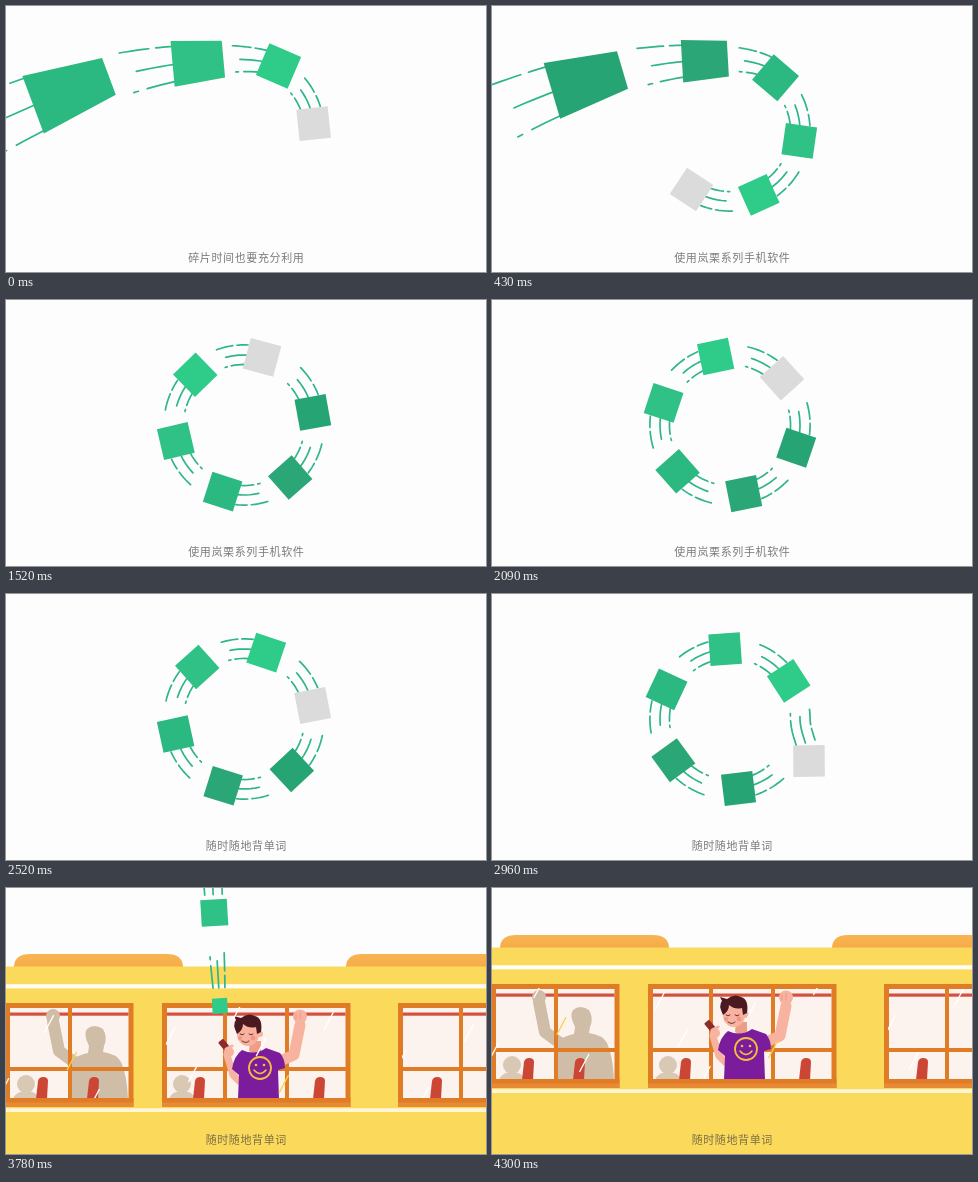
These frames come from a looping animation (480x266 px, 4.34 s). An HTML page:

```html
<!DOCTYPE html>
<html lang="zh-CN">
<head>
<meta charset="utf-8">
<style>
  html, body { margin: 0; width: 100%; height: 100%; overflow: hidden; background: #fdfdfe; }
  svg { display: block; width: 100vw; height: 100vh; }
  #caption {
    font: 500 11px "Noto Sans CJK SC", "Noto Sans CJK", sans-serif;
    letter-spacing: .62px; text-anchor: middle; fill: #3c3c3c; fill-opacity: .68;
  }
</style>
</head>
<body>
<svg id="stage" viewBox="0 0 480 266">
  <defs>
    <linearGradient id="hump" x2="0" y2="1">
      <stop offset="0" stop-color="#f8b452"/><stop offset="1" stop-color="#f6ab48"/>
    </linearGradient>
    <clipPath id="pane"><rect x="160" y="100" width="180" height="92"/></clipPath>
  </defs>
  <rect width="480" height="266" fill="#fdfdfe"/>
  <g id="bus"></g>
  <g id="cards"></g>
  <text id="caption" x="240.3" y="255.6"></text>
</svg>
<script>
const LOOP = 4340;
const PAN = 440;
const CENTER = { x: 238, y: 125, r: 70 };
const RING_START = -50, RING_END = 360;
const COLORS = ['#dbdbdc', '#2ecb89', '#2fc186', '#2bb981', '#2ba777', '#26a473'];
const CAPTIONS = [[0, '碎片时间也要充分利用'], [300, '使用岚栗系列手机软件'], [2520, '随时随地背单词']];
const $ = id => document.getElementById(id);
const clamp = (v, a = 0, b = 1) => Math.min(b, Math.max(a, v));
const rad = deg => deg * Math.PI / 180;

// Keys are [position, value, slope]; straight lines continue past both ends.
function hermite(keys, x) {
  const line = ([p, v, m]) => v + m * (x - p);
  if (x <= keys[0][0]) return line(keys[0]);
  const i = keys.findIndex(k => k[0] > x);
  if (i < 0) return line(keys[keys.length - 1]);
  const [x0, v0, m0] = keys[i - 1], [x1, v1, m1] = keys[i];
  const h = x1 - x0, u = (x - x0) / h, w = 1 - u;
  return v0 * (1 + 2 * u) * w * w + m0 * h * u * w * w
       + v1 * u * u * (3 - 2 * u) - m1 * h * u * u * w;
}

// Progress of the leading card, in degrees around the ring.
const TRAVEL = [[0, -6, .27], [910, 233.5, .12], [2090, 318, .066], [2960, 388, .1],
                [3390, 541, .4], [3780, 698, .43], [4300, 975, .58]];
const CAMERA = [[2970, 0, 0], [3390, 260, 1], [3780, 421, .1], [4300, PAN, 0]];
// The chain of cards stretches slightly as it travels.
const spacing = t => 57 + t * .00135;

const ENTRY = {
  x: [[-237, -90, 2.8], [-177, 65, 2.4], [-120, 192, 1.65], [-63, 272.5, 1.1], [-50, 283, .936]],
  y: [[-237, 155, -1.4], [-177, 84.5, -.9], [-120, 55.5, -.15], [-63, 60, .45], [-50, 71.4, .785]],
  size: [[-237, 120, -.7], [-177, 81, -.6], [-120, 51, -.4], [-63, 34.5, -.1], [0, 31.5, 0]]
};
const EXIT = {
  x: [[125, 308, 0], [168, 317, -.02], [240, 325, -.02], [309, 311, -.35], [397, 264, -.5], [560, 217, -.1]],
  size: [[125, 31.5, 0], [309, 31.5, 0], [397, 30, -.04], [441, 27, -.1], [547, 13, -.3], [570, 5, -.4]]
};
const LANDING = 566;

function point(s, t) {
  if (s < RING_START) return { x: hermite(ENTRY.x, s), y: hermite(ENTRY.y, s) };
  if (s < RING_END) {
    const a = rad(s);
    return { x: CENTER.x + CENTER.r * Math.cos(a), y: CENTER.y + CENTER.r * Math.sin(a) };
  }
  const y = CENTER.y + 1.5 * (s - RING_END);
  const u = clamp((t - 3390) / 390), sway = u * u * (3 - 2 * u);
  const straight = 208 + .06 * (y - 441);
  return { x: hermite(EXIT.x, y) * (1 - sway) + straight * sway, y };
}

function pose(s, t) {
  const p = point(s, t), a = point(s - .5, t), b = point(s + .5, t);
  const size = s < RING_END ? hermite(ENTRY.size, s) : Math.max(2, hermite(EXIT.size, p.y));
  return { ...p, size, angle: Math.atan2(b.y - a.y, b.x - a.x) };
}

// Point at (along, across) in a pose's own axes.
const local = (p, along, across) => {
  const c = Math.cos(p.angle), n = Math.sin(p.angle);
  return `${(p.x + along * c - across * n).toFixed(2)},${(p.y + along * n + across * c).toFixed(2)}`;
};

// Each line: [offset across the card, [from, to] behind it, ...]
const TRAILS = [[-.32, [12, 20], [23, 35]], [0, [12, 30]], [.3, [12, 27], [31, 33]]];

function trailPath(s, t) {
  let d = '';
  for (const [offset, ...dashes] of TRAILS)
    for (const [from, to] of dashes)
      for (let i = 0; i <= 5; i++) {
        const p = pose(s - from - (to - from) * i / 5, t);
        d += (i ? 'L' : 'M') + local(p, 0, offset * p.size);
      }
  return d;
}

// Cards far up the entry path are seen in perspective.
function cardShape(s, t) {
  const p = pose(s, t), depth = clamp((-63 - s) / 114);
  const w = p.size / 2, h = w * (1 - .38 * depth), k = .22 * depth;
  return [[-w, -h * (1 + k)], [w, -h * (1 - k)], [w, h * (1 - k)], [-w, h * (1 + k)]]
    .map(c => local(p, ...c)).join(' ');
}

const rect = (x, y, w, h, fill, r = 0) =>
  `<rect x="${x}" y="${y}" width="${w}" height="${h}" rx="${r}" fill="${fill}"/>`;
const circle = (x, y, r, fill) => `<circle cx="${x}" cy="${y}" r="${r}" fill="${fill}"/>`;
const fill = (d, color) => `<path d="${d}" fill="${color}"/>`;
const stroke = (d, color, width) =>
  `<path d="${d}" fill="none" stroke="${color}" stroke-width="${width}" stroke-linecap="round" stroke-linejoin="round"/>`;

const seat = x => fill(`M${x} 192L${x + 2} 174Q${x + 3} 170 ${x + 7} 170Q${x + 12} 170 ${x + 12} 174L${x + 11} 192Z`, '#cb4635');
const TAN = '#cfbda7', SKIN = '#f7b39f', HAIR = '#4b1a20', SHIRT = '#7a1c9c', GOLD = '#f3bf3f';

const child = x => circle(x, 177, 9, '#d8c8b4')
  + fill(`M${x - 13} 192Q${x - 10} 184 ${x} 184Q${x + 11} 184 ${x + 13} 192Z`, '#d8c8b4');

const passenger =
  fill('M62 192L66 152Q76 147 82 146L83 139Q77 127 81 122Q88 116 97 122Q102 130 98 139L97 145Q111 147 115 155Q121 168 122 192Z', TAN)
  + stroke('M72 158L53 144L47 114', TAN, 12) + circle(47, 109, 7, TAN);

const hero =
  stroke('M274 154L288 148L294 118', SKIN, 11) + circle(294, 109.5, 7, SKIN)
  + stroke('M290 107V112M294 106V112', '#e8927e', .8)
  + stroke('M221 148L227 168L233 174', SKIN, 7)
  + fill('M244 134H255V144Q250 149 243 144Z', '#ee9d88')
  + fill('M236 143Q249 149 260 141L274 146Q279 152 279 161L272 163L273 192H232L233 168L226 162Q228 149 236 143Z', SHIRT)
  + `<ellipse cx="242" cy="127" rx="11" ry="12" fill="${SKIN}"/>` + circle(254, 127, 3, SKIN)
  + fill('M231 127Q226 117 230 113L228 109L235 111Q242 105 249 109Q257 111 255 125L251 127L250 120Q243 122 237 117Q237 123 231 127Z', HAIR)
  + circle(247, 131, 2.4, '#f29583') + circle(234, 131, 2, '#f29583')
  + stroke('M234 127Q236 129 238 127M243 127Q245 129 247 127M236 134Q240 137 243 134', '#6b2a2a', 1)
  + `<rect x="-7" y="-3.2" width="14" height="6.4" rx="1" fill="#8d2a2a" transform="translate(219 139) rotate(50)"/>`
  + circle(223, 145, 5, SKIN) + stroke('M220 142L226 139', SKIN, 3)
  + `<circle cx="254" cy="161" r="11" fill="none" stroke="${GOLD}" stroke-width="1.8"/>`
  + circle(250, 158, 1.3, GOLD) + circle(258, 158, 1.3, GOLD)
  + stroke('M248 163Q254 170 260 163', GOLD, 1.6);

const ORANGE = '#e17c26';
const carWindow = (dx, behind, front, index) => `<g transform="translate(${dx} 0)">
  ${rect(156, 96, 188.5, 104, ORANGE)}${rect(161, 101, 178.5, 90, '#fdf3ee')}
  ${rect(161, 105.5, 178.5, 3.2, '#d4513f')}
  <g transform="translate(${-dx} 0)">${behind}</g>
  ${rect(217, 99, 4, 93, ORANGE)}${rect(279, 99, 4, 93, ORANGE)}${rect(159, 160, 183, 4, ORANGE)}
  <g transform="translate(${-dx} 0)">${front}</g>
  <g clip-path="url(#pane)" id="rain${index}"></g>
  ${rect(156, 191, 188.5, 4.5, ORANGE)}${rect(156, 195.5, 188.5, 4.5, '#e88a34')}
</g>`;

const roofHump = x => `<path d="M${x} 61V59Q${x + 1} 47 ${x + 16} 47H${x + 153}Q${x + 168} 47 ${x + 169} 59V61Z" fill="url(#hump)"/>`;

$('bus').innerHTML = roofHump(8) + roofHump(340)
  + rect(0, 59.5, 480, 210, '#fbd95b') + rect(0, 77.2, 480, 4.2, '#fffdf4') + rect(0, 201.2, 480, 3.8, '#fff6d8')
  + carWindow(-217, child(20) + passenger, seat(30) + seat(81), 0)
  + carWindow(0, child(176), seat(187) + seat(307) + hero, 1)
  + carWindow(236, '', seat(424), 2);

$('cards').innerHTML = COLORS.map(c =>
  `<g>${stroke('', '#2fb58b', 1.7)}<polygon fill="${c}"/></g>`).join('');
const cards = [...$('cards').children];

function rain(index, t) {
  let lines = '';
  for (let k = 0; k < 6; k++) {
    const u = (t / 620 + k * .37 + index * .23) % 1;
    const x = 176 + k * 31 - 22 * u, y = 88 + 100 * u;
    lines += stroke(`M${x} ${y}l-9 17`, k === 4 ? '#f6d447' : '#ffffff', 1.3);
  }
  $('rain' + index).innerHTML = lines;
}

function draw(t) {
  const camera = t < 2970 ? 0 : Math.min(PAN, hermite(CAMERA, t));
  const lead = hermite(TRAVEL, t);
  $('bus').setAttribute('transform', `translate(0 ${PAN - camera})`);
  $('cards').setAttribute('transform', `translate(0 ${-camera})`);
  cards.forEach((card, i) => {
    const s = lead - spacing(t) * i;
    const visible = s < RING_END || point(s, t).y < LANDING;
    card.style.display = visible ? '' : 'none';
    if (!visible) return;
    card.firstChild.setAttribute('d', trailPath(s, t));
    card.lastChild.setAttribute('points', cardShape(s, t));
  });
  if (camera > 0) [0, 1, 2].forEach(i => rain(i, t));
  $('caption').textContent = CAPTIONS.filter(c => c[0] <= t).pop()[1];
}

let start;
function tick(now) {
  start ??= now;
  draw((now - start) % LOOP);
  requestAnimationFrame(tick);
}
draw(0);
requestAnimationFrame(tick);
</script>
</body>
</html>
```
